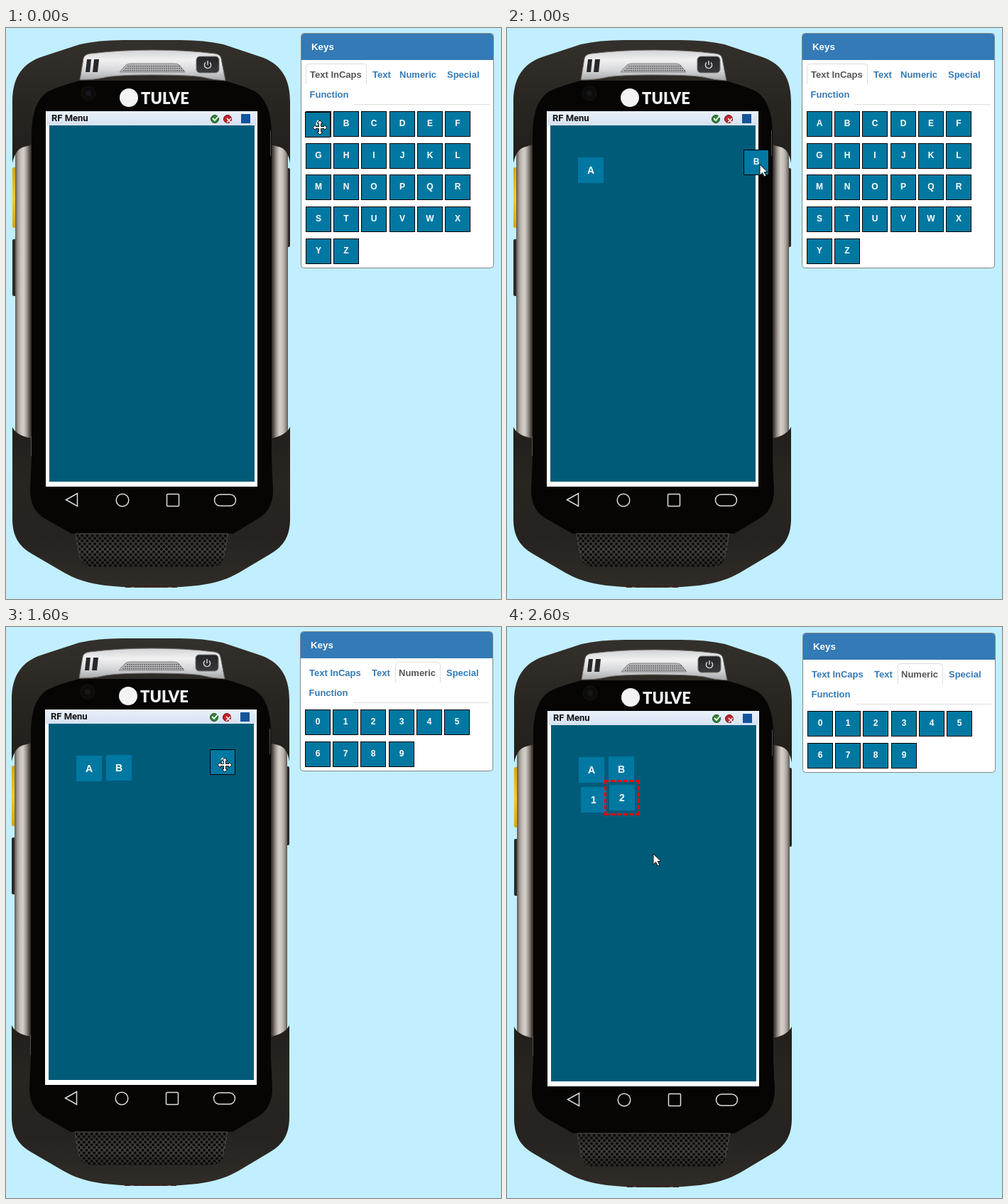
These frames come from a looping animation (697x803 px, 2.8 s). An HTML page with a canvas:

```html
<!DOCTYPE html>
<html lang="en">
<head>
<meta charset="utf-8">
<style>
html, body { margin: 0; width: 100%; height: 100%; overflow: hidden; background: #c1efff; }
canvas { display: block; }
</style>
</head>
<body>
<canvas id="stage" width="697" height="803"></canvas>
<script>
const ctx = document.getElementById('stage').getContext('2d');
const STEP = 200;
const ARIAL = '"Liberation Sans", Arial, sans-serif';
const KEY = '#0078a2';

// Placed keys: label, position, first step in which they stay on the screen
const placed = [['A', 100, 182, 3], ['B', 142, 181, 6], ['1', 103, 224, 9], ['2', 143, 221, 12]];

// One entry per step: camera shake, cursor, dragged key, selected key
const steps = [
  { shake: [0, 0], cursor: ['move', 442, 140], drag: ['A', 421, 118] },
  { shake: [1, -1], cursor: ['move', 270, 170], drag: ['A', 248, 148] },
  { shake: [-1, -1], cursor: ['move', 122, 204], drag: ['A', 100, 182] },
  { shake: [2, -1], cursor: ['arrow', 126, 208], select: 'A' },
  { shake: [3, -1], cursor: ['arrow', 478, 136] },
  { shake: [0, 0], cursor: ['arrow', 356, 192], drag: ['B', 333, 171] },
  { shake: [1, -1], cursor: ['arrow', 166, 204], select: 'B' },
  { shake: [1, 0], cursor: ['arrow', 574, 71], numeric: true },
  { shake: [-1, -1], cursor: ['move', 309, 195], drag: ['1', 288, 173], numeric: true },
  { shake: [1, 0], cursor: ['resize', 134, 259], select: '1', numeric: true },
  { shake: [0, 1], cursor: ['move', 520, 138], numeric: true },
  { shake: [-1, -1], cursor: ['move', 311, 208], drag: ['2', 290, 186], numeric: true },
  { shake: [1, -1], cursor: ['resize', 174, 256], select: '2', numeric: true },
  { shake: [1, 1], cursor: ['arrow', 205, 318], select: '2', numeric: true }
];

function rect(x, y, w, h, color) {
  ctx.fillStyle = color;
  ctx.fillRect(x, y, w, h);
}

function paint(path, fill, stroke, width = 1) {
  if (fill) { ctx.fillStyle = fill; ctx.fill(path); }
  if (stroke) { ctx.strokeStyle = stroke; ctx.lineWidth = width; ctx.stroke(path); }
}

function shape(d, fill, stroke, width) {
  const path = new Path2D(d);
  paint(path, fill, stroke, width);
  return path;
}

function round(x, y, w, h, r, fill, stroke, width) {
  const path = new Path2D();
  path.roundRect(x, y, w, h, r);
  paint(path, fill, stroke, width);
}

function disc(x, y, r, fill, stroke, width) {
  const path = new Path2D();
  path.arc(x, y, r, 0, Math.PI * 2);
  paint(path, fill, stroke, width);
}

function text(str, x, y, font, color, align = 'left') {
  ctx.font = font;
  ctx.fillStyle = color;
  ctx.textAlign = align;
  ctx.fillText(str, x, y);
}

function gradient(x0, y0, x1, y1, colors) {
  const g = ctx.createLinearGradient(x0, y0, x1, y1);
  colors.forEach((c, i) => g.addColorStop(i / (colors.length - 1), c));
  return g;
}

function drawBody() {
  // Side buttons and metal rails
  round(9, 196, 8, 85, 2, gradient(0, 196, 0, 281, ['#d9a514', '#f7ca2e', '#d9a514']));
  round(9, 297, 8, 80, 2, '#2c2b2b');
  round(392, 197, 8, 111, 2, '#2c2826');
  const metal = ['#5f5751', '#a59d97', '#c9c3be', '#d3cec9', '#a39b95', '#5d554f', '#1c1815'];
  rect(13, 160, 24, 422, gradient(13, 0, 37, 0, metal));
  rect(373, 160, 24, 422, gradient(397, 0, 373, 0, metal));

  // Rubber caps
  shape('M9 190 V104 C9 68 24 49 52 40 L104 23 Q130 17 165 17 H245 Q280 17 306 23 L357 40 C385 49 400 68 400 104 V190 Q397 170 384 167 L372 164 H37 L26 167 Q13 170 9 190Z',
    gradient(0, 17, 0, 190, ['#34302c', '#292622', '#211e1b']));
  shape('M9 561 Q14 573 36 577 H374 Q394 573 400 561 V690 C400 718 388 731 370 741 L328 766 C300 782 268 787 205 787 C142 787 110 782 82 766 L39 741 C21 731 9 718 9 690Z',
    gradient(0, 561, 0, 787, ['#211e1b', '#292622', '#25221f', '#302c28']));

  // Black face
  shape('M36 606 V150 Q36 105 58 90 Q70 83 104 74 H307 Q340 83 352 90 Q374 105 374 150 V606 L376 650 Q376 678 355 690 L320 711 H92 L55 690 Q34 678 34 650Z', '#060504');
  rect(372, 144, 1, 36, '#57524e');
  rect(35, 574, 1, 28, '#57524e');
}

function drawTopPlate() {
  shape('M104 73 L109 43 Q110 37 119 36 Q160 31 206 31 Q254 31 294 36 Q302 37 303 43 L309 74 Q291 73 276 69 Q258 66 205 66 Q153 66 137 70 Q124 73 104 73Z',
    gradient(0, 31, 0, 74, ['#d2d3d5', '#f1f1f2', '#d5d6d8', '#a4a5a8']), '#706d6b');
  shape('M114 44 H120 L118 62 H112Z M124 44 H131 L129 62 H122Z', '#282729');
  shape('M160 62 Q163 58 169 52 Q171 50 177 50 H236 Q242 50 244 52 L252 62Z', '#b3b3b5', '#858588');
  for (let row = 0; row < 3; row++) {
    for (let x = 171 - row * 3; x < 244 + row * 3; x += 3) rect(x, 53 + row * 3, 2, 1.5, '#69696c');
  }
  round(268, 40, 32, 23, 5, gradient(0, 40, 0, 63, ['#242426', '#39393b']), '#777');
  ctx.beginPath();
  ctx.arc(284, 52, 4.6, -Math.PI * 0.28, Math.PI * 1.28);
  ctx.strokeStyle = '#ddd';
  ctx.lineWidth = 1.4;
  ctx.stroke();
  rect(283.3, 46, 1.4, 6, '#ddd');
  disc(116, 92, 10, '#0d0c0b', '#171513');
  disc(116, 92, 4, '#17171a');
  disc(173, 98, 13, '#f3f3f3');
  text('TULVE', 190, 107, '900 22px Lato, sans-serif', '#f3f3f3');
}

function drawGrille() {
  const outline = shape('M98 711 H313 Q311 740 304 751 Q299 758 287 758 H124 Q111 758 107 751 Q99 738 98 711Z',
    gradient(0, 711, 0, 758, ['#302e2b', '#46433f', '#2a2725']));
  ctx.save();
  ctx.clip(outline);
  for (let row = 0; row < 14; row++) {
    for (let x = 100 + (row % 2) * 3.6; x < 313; x += 7.2) disc(x, 714 + row * 3.8, 2, '#0b0a09');
  }
  ctx.restore();
  shape('M98 711 L104 745 M313 711 L306 745 M98 711 H313', null, '#4a4642');
  for (let x = 168; x < 235; x += 13) rect(x, 784, 8, 3, '#3a2420');
}

function drawScreen() {
  rect(56, 117, 298, 528, '#fff');
  rect(57, 117, 296, 20, gradient(0, 117, 0, 137, ['#eaf1fb', '#d6e1f1']));
  rect(61, 137, 289, 501, '#005b79');
  text('RF Menu', 64, 131, 'bold 13px Roboto, sans-serif', '#111');
  disc(294, 128, 5.5, '#35843a', '#1d4b22');
  shape('M291 127 L294 130 L300 123', null, '#f5fff2', 1.8);
  disc(312, 128, 5.5, '#c5222b', '#6e1015');
  shape('M311 127 L317 133 M317 127 L311 133', null, '#fff', 1.5);
  rect(331, 121, 13, 13, '#14549b');

  shape('M84.5 663.5 L100.5 654.5 V672.5Z', null, '#dedede', 1.5);
  disc(164, 664, 8.8, null, '#dedede', 1.5);
  round(226.5, 655.5, 17, 17, 1.5, null, '#dedede', 1.5);
  round(293.5, 656, 30, 16, 8, null, '#dedede', 1.5);
}

function drawKey(label, x, y, bordered) {
  x = Math.round(x);
  y = Math.round(y);
  rect(x, y, 36, 36, bordered ? '#000' : KEY);
  if (bordered) rect(x + 1, y + 1, 34, 34, KEY);
  text(label, x + 18, y + (bordered ? 21 : 23), `bold ${bordered ? 12 : 14}px ${ARIAL}`, '#fff', 'center');
}

function drawPanel(numeric) {
  const labels = numeric ? '0123456789' : 'ABCDEFGHIJKLMNOPQRSTUVWXYZ';
  const height = numeric ? 196 : 330;
  round(415.5, 7.5, 271, height, 4, '#fff');
  round(416, 8, 270, 37, [4, 4, 0, 0], '#337ab7');
  round(415.5, 7.5, 271, height, 4, null, '#858585');
  text('Keys', 430, 31, `bold 13.3px ${ARIAL}`, '#fff');

  const [left, width] = numeric ? [549.5, 63] : [422.5, 85];
  shape(`M${left} 79 V54.5 q0 -4 4 -4 h${width - 8} q4 0 4 4 V79`, null, '#ddd');
  rect(490, 107, 191, 1, '#ddd');
  const active = numeric ? 'Numeric' : 'Text InCaps';
  const tabs = [['Text InCaps', 428, 70], ['Text', 516, 70], ['Numeric', 554, 70], ['Special', 621, 70], ['Function', 427.5, 98]];
  for (const [name, x, y] of tabs) {
    text(name, x, y, `bold 13px ${ARIAL}`, name === active ? '#555' : '#337ab7');
  }
  [...labels].forEach((label, i) => {
    drawKey(label, 421.8 + (i % 6) * 39.25, 117 + Math.floor(i / 6) * 44.65, true);
  });
}

// Dashed frame whose dashes meet in every corner
function drawSelection(x, y) {
  const l = x - 7, t = y - 7, r = x + 43, b = y + 43;
  ctx.setLineDash([6, 2.8]);
  shape(`M${l} ${t + 1.5} H${r} M${l} ${b - 1.5} H${r} M${l + 1.5} ${t} V${b} M${r - 1.5} ${t} V${b}`, null, '#f00', 3);
  ctx.setLineDash([]);
}

const cursors = {
  arrow: 'M0 0 V15 L3.6 11.7 L6.2 17 L8.8 15.8 L6.3 10.6 H11Z',
  move: 'M0 -10 L4 -6 H1.5 V-1.5 H6 V-4 L10 0 L6 4 V1.5 H1.5 V6 H4 L0 10 L-4 6 H-1.5 V1.5 H-6 V4 L-10 0 L-6 -4 V-1.5 H-1.5 V-6 H-4Z',
  resize: 'M0 -10 L4 -6 H1.2 V6 H4 L0 10 L-4 6 H-1.2 V-6 H-4Z'
};

function drawCursor(kind, x, y) {
  ctx.save();
  ctx.translate(x, y);
  shape(cursors[kind], '#fff', '#111');
  ctx.restore();
}

function draw(index) {
  const { shake, cursor, drag, select, numeric } = steps[index];
  ctx.setTransform(1, 0, 0, 1, 0, 0);
  rect(0, 0, 697, 803, '#c1efff');
  ctx.translate(...shake);
  drawBody();
  drawTopPlate();
  drawGrille();
  drawScreen();
  drawPanel(numeric);
  for (const [label, x, y, since] of placed) {
    if (index < since) continue;
    drawKey(label, x, y, false);
    if (label === select) drawSelection(x, y);
  }
  if (drag) drawKey(...drag, true);
  drawCursor(...cursor);
}

let shown = -1;
const start = performance.now();
function tick() {
  const index = Math.floor((performance.now() - start) / STEP) % steps.length;
  if (index !== shown) draw(shown = index);
  requestAnimationFrame(tick);
}
tick();
</script>
</body>
</html>
```
